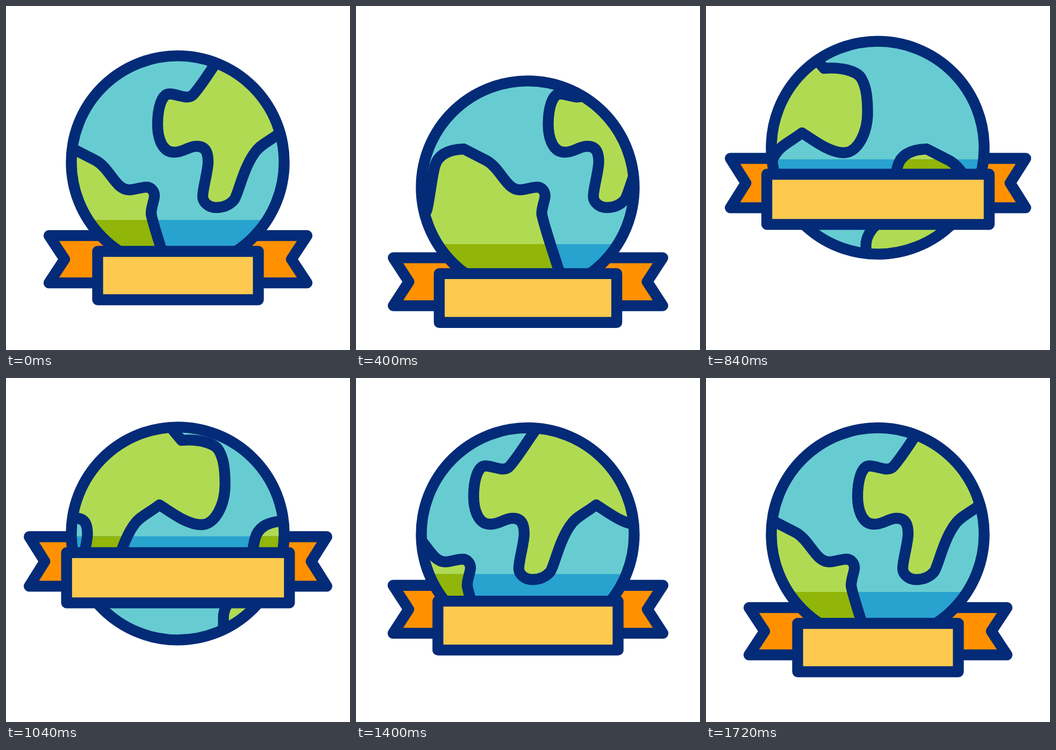
Animation, 640 px wide and 640 px high, one loop 2000 ms. Source, as an HTML page:

```html
<!DOCTYPE html>
<html lang="en">
<head>
<meta charset="utf-8">
<title>Spinning globe with ribbon</title>
<style>
  html, body { margin: 0; width: 100%; height: 100%; overflow: hidden; background: #fff; }
  svg { display: block; width: 100%; height: 100%; }
  .line { stroke: #032b77; stroke-width: 20.3; stroke-linejoin: round; stroke-linecap: round; }
</style>
</head>
<body>
<svg viewBox="0 0 640 640">
  <defs>
    <path id="south" d="M12 560V445C12 428 22 415 34 404S52 391 56 380 65 320 71 298 97 267 125 266
      L168 288C194 303 204 342 229 342C240 342 251 337 261 337S277 346 276 355 270 374 270 387
      Q273 402 287 446L324 560"/>
    <path id="north" d="M430 49L385 114Q362 149 350 163C339 177 322 164 304 163.5
      C289 163.5 282 192 282 220S292 272 312 272 338 261 355 261 376 274 376 290 366 340 366 354
      C366 366 378 375 391 375S416 370 424 361 441 300 465 270C474 258 490 251 510 236
      C535 252 562 273 588 273S632 235 632 198 627 146 620 134 585 113 551 116L536 98L520 60"/>
    <g id="pair"><use href="#south"/><use href="#north"/></g>
    <g id="land"><use href="#pair"/><use href="#pair" x="-617"/></g>
    <clipPath id="disc"><circle class="globe" cx="319.5" r="198"/></clipPath>
    <clipPath id="band"><rect id="shade" width="640"/></clipPath>
  </defs>

  <path id="tail" class="line" fill="#ff9100"/>
  <use href="#tail" transform="translate(640) scale(-1 1)"/>

  <g clip-path="url(#disc)">
    <rect width="640" height="640" fill="#67ccd1"/>
    <use class="land" href="#land" fill="#b1da53"/>
    <g clip-path="url(#band)">
      <rect width="640" height="640" fill="#28a2cf"/>
      <use class="land" href="#land" fill="#91b508"/>
    </g>
    <use class="land line" href="#land" fill="none"/>
  </g>
  <circle class="globe line" cx="319.5" r="198" fill="none"/>
  <rect id="banner" class="line" fill="#fdca4f"/>
</svg>
<script>
const LOOP = 2000, STEP = 40, END = 1720, TURN = 617;
const $ = id => document.getElementById(id);
const each = (sel, fn) => document.querySelectorAll(sel).forEach(fn);
const set = (el, attrs) => {
  for (const k in attrs) el.setAttribute(k, attrs[k]);
};

// 0 to 1 between times a and b, slow at both ends.
function ease(t, a, b) {
  const u = Math.min(1, Math.max(0, (t - a) / (b - a)));
  return u * u * (3 - 2 * u);
}

// Dip to `low` at 360 ms, move on to `high` from b to c, back to 0 at d.
const swing = (t, low, high, b, c, d) =>
  low * ease(t, 40, 360) + (high - low) * ease(t, 360, b) - high * ease(t, c, d);

function draw(t) {
  const cy = 290.7 + swing(t, 49, -32, 760, 760, 1080);
  const mid = 501.5 + swing(t, 45, -145, 880, 880, 1680);
  const dark = 398 + swing(t, 48, -113, 850, 900, 1680);
  const wide = swing(t, 15, 61, 940, 940, 1660);
  const out = 37.5 * (ease(t, 80, 990) - ease(t, 990, 1630));
  const spin = t < END ? TURN * ease(t, 25, 1740) : TURN;

  const w = 149.5 + wide, h = 45 + wide * 0.03;
  const fork = 44 + out * 0.055;

  each('.globe', el => set(el, { cy }));
  each('.land', el => set(el, { transform: `translate(${spin})` }));
  set($('banner'), { x: 320 - w, y: mid - h, width: 2 * w, height: 2 * h });
  set($('shade'), { y: dark, height: mid - dark });
  set($('tail'), {
    d: `M200 ${mid - 30.3 - fork}H${80 - out}l29 ${fork}l-29 ${fork}H200`
  });
}

function tick(now) {
  const t = now % LOOP;
  draw(Math.min(END, Math.floor(t / STEP) * STEP));
  requestAnimationFrame(tick);
}
draw(0);
requestAnimationFrame(tick);
</script>
</body>
</html>
```
